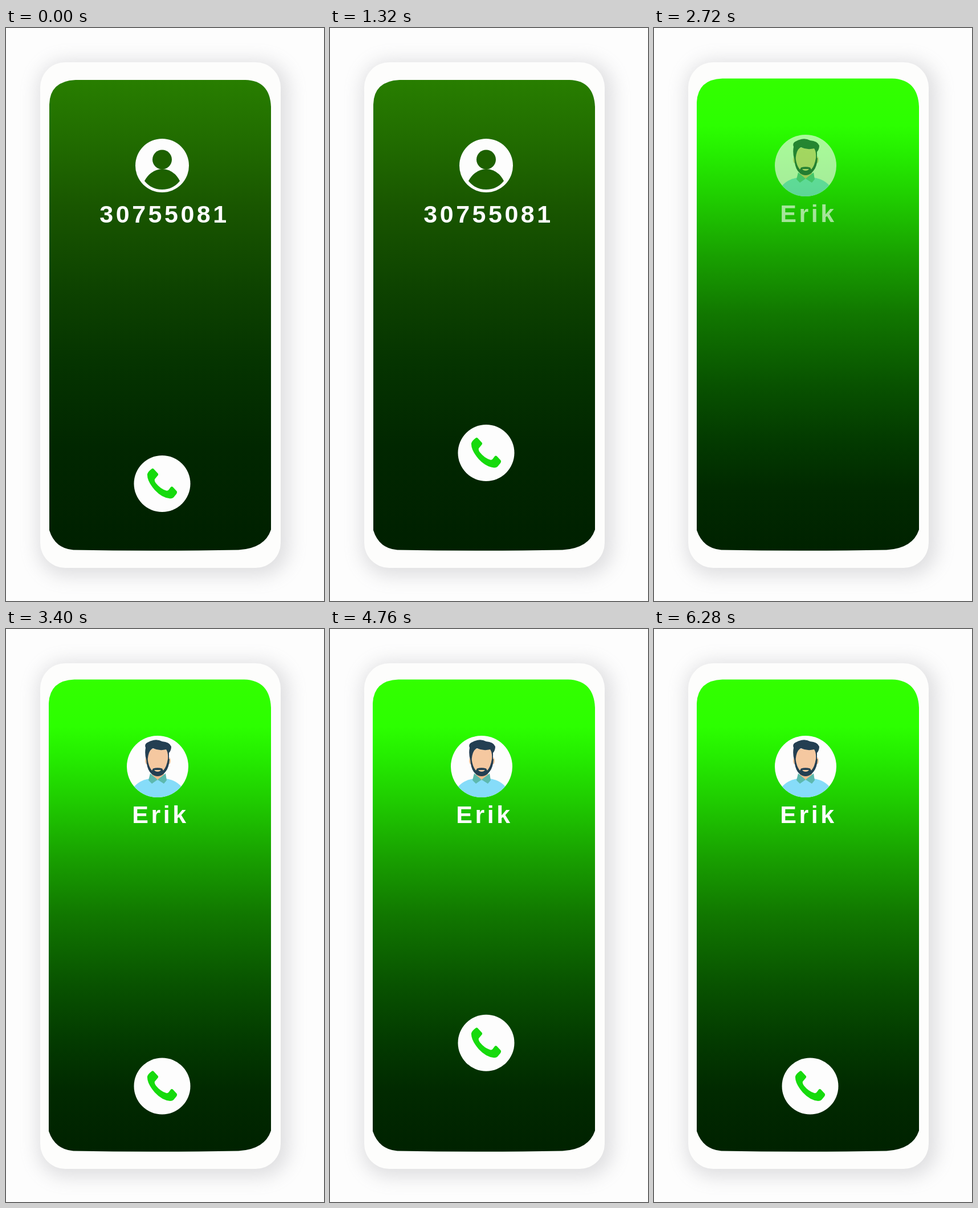
Animation, 558 px wide and 1004 px high, one loop 6.32 s. Source, as an HTML page:

```html
<!DOCTYPE html>
<html lang="en">
<head>
<meta charset="utf-8">
<title>Incoming call</title>
<style>
  html, body { margin: 0; width: 100%; height: 100%; overflow: hidden; background: #fdfdfd; }
  svg { display: block; width: 100%; height: 100%; }
  text { font: bold 43px "Liberation Sans", Arial, sans-serif; fill: #fdfdfd; text-anchor: middle; }
</style>
</head>
<body>
<svg viewBox="0 0 558 1004">
  <defs>
    <linearGradient id="dark" gradientUnits="userSpaceOnUse" x1="0" y1="90" x2="0" y2="915">
      <stop offset="0" stop-color="#287e00"/>
      <stop offset=".13" stop-color="#216c00"/>
      <stop offset=".27" stop-color="#195600"/>
      <stop offset=".45" stop-color="#0d4200"/>
      <stop offset=".6" stop-color="#053400"/>
      <stop offset=".78" stop-color="#012700"/>
      <stop offset="1" stop-color="#002000"/>
    </linearGradient>
    <linearGradient id="bright" gradientUnits="userSpaceOnUse" x1="0" y1="88" x2="0" y2="915">
      <stop offset="0" stop-color="#33ff00"/>
      <stop offset=".1" stop-color="#2cff00"/>
      <stop offset=".16" stop-color="#25ee00"/>
      <stop offset=".26" stop-color="#1fcb00"/>
      <stop offset=".38" stop-color="#189f00"/>
      <stop offset=".5" stop-color="#117700"/>
      <stop offset=".65" stop-color="#085200"/>
      <stop offset=".77" stop-color="#033a00"/>
      <stop offset=".87" stop-color="#012a00"/>
      <stop offset="1" stop-color="#002200"/>
    </linearGradient>
    <filter id="blur" filterUnits="userSpaceOnUse" x="0" y="0" width="558" height="1004">
      <feGaussianBlur stdDeviation="16"/>
    </filter>
    <clipPath id="disc"><circle cx="266" cy="241" r="54"/></clipPath>
  </defs>

  <rect width="558" height="1004" fill="#fdfdfd"/>
  <rect x="56" y="58" width="440" height="902" rx="50" fill="#87878f" opacity=".26" filter="url(#blur)"/>
  <rect x="60" y="60" width="422" height="886" rx="44" fill="#fdfdfc"/>

  <g id="unknown">
    <path fill="url(#dark)" d="M76 134Q77 93 122 91H420Q463 92 465 138V879Q454 912 408 914.500Q270 917 118 914.500Q86 912 76 880Z"/>
    <circle cx="274" cy="241" r="47" fill="#fdfdfd"/>
    <g fill="#1d6000">
      <circle cx="274" cy="230.500" r="17"/>
      <path d="M243 268Q254 248 274 247Q295 248 305 268Q293 283 274 283Q255 283 243 268Z"/>
    </g>
    <text x="278" y="341" letter-spacing="4.500">30755081</text>
  </g>

  <g id="known">
    <path fill="url(#bright)" d="M75 130Q77 90 120 88.500H418Q463 90 465 138V879Q454 912 408 914.500Q270 917 118 914.500Q86 912 75 880Z"/>
    <g id="contact">
      <circle cx="266" cy="241" r="54" fill="#fdfdfd"/>
      <g clip-path="url(#disc)">
        <path fill="#86dcf9" d="M222 280Q232 265 253 262H280Q300 265 310 279V300H222Z"/>
        <path fill="#eeb98c" d="M256 246H277V258L266 265L256 258Z"/>
        <path fill="#5db9ae" d="M253 253L266 264L280 253L282 265L277 271L266 264L256 271L250 265Z"/>
        <g fill="#f5c8a0">
          <ellipse cx="247" cy="231" rx="3" ry="6"/>
          <ellipse cx="286" cy="231" rx="3" ry="6"/>
          <path d="M249 210H284V236Q281 256 266 256Q251 254 249 236Z"/>
        </g>
        <g fill="#243f52">
          <path d="M246 229Q243 218 245 208Q242 201 250 198Q263 191 274 197Q287 198 290 206Q290 213 286 217V229H284Q285 216 281 211Q269 214 258 209Q250 212 248.500 229Z"/>
          <path d="M246 228H248.500Q250 241 256 248L258 244.500Q266 242 274 244.500L276 248Q282 241 284 228H287Q286 243 280 250Q274 258 266 258Q258 258 252 250Q247 243 246 228Z"/>
        </g>
        <path fill="#f5c8a0" d="M260 247H272Q270 250 266 250Q262 250 260 247Z"/>
      </g>
      <text x="271" y="340" letter-spacing="4.500">Erik</text>
    </g>
  </g>

  <g id="button">
    <circle r="49.500" fill="#fdfdfd"/>
    <path fill="#16da0d" d="M-19-25.500Q-16-28-14-25L-7.500-18Q-6-16-8-14L-13-8Q-14-5-11-1Q-3 9 7 12Q10 13 12 10L15 6Q17 4 19 6L25.500 13Q27 15 25 18L20 24Q18 26 14 26Q0 25-13 11Q-27-5-26-17Q-25-21-19-25.500Z"/>
  </g>
</svg>

<script>
  const LOOP = 6320, SWITCH = 2480, FADE = 400;
  const HOP = 1040, HOPS = 2, HEIGHT = 77, REST = 801;
  const STARTS = [-60, 4200];

  const el = id => document.getElementById(id);
  const unknown = el("unknown"), known = el("known"), contact = el("contact"), button = el("button");
  const ramp = (t, from) => Math.min(1, Math.max(0, (t - from) / FADE));

  function lift(t, start) {
    const n = (t - start) / HOP;
    return n > 0 && n < HOPS ? HEIGHT * Math.sin(Math.PI * n) ** 2 : 0;
  }

  function draw(t) {
    const answered = t >= SWITCH;
    unknown.style.display = answered ? "none" : "";
    known.style.display = answered ? "" : "none";
    contact.setAttribute("opacity", ramp(t, SWITCH));
    button.setAttribute("opacity", answered ? ramp(t, SWITCH + FADE) : 1);
    button.setAttribute("transform", `translate(274 ${REST - lift(t, STARTS[+answered])})`);
  }

  const begin = performance.now();
  function tick() {
    draw((performance.now() - begin) % LOOP);
    requestAnimationFrame(tick);
  }
  tick();
</script>
</body>
</html>
```
